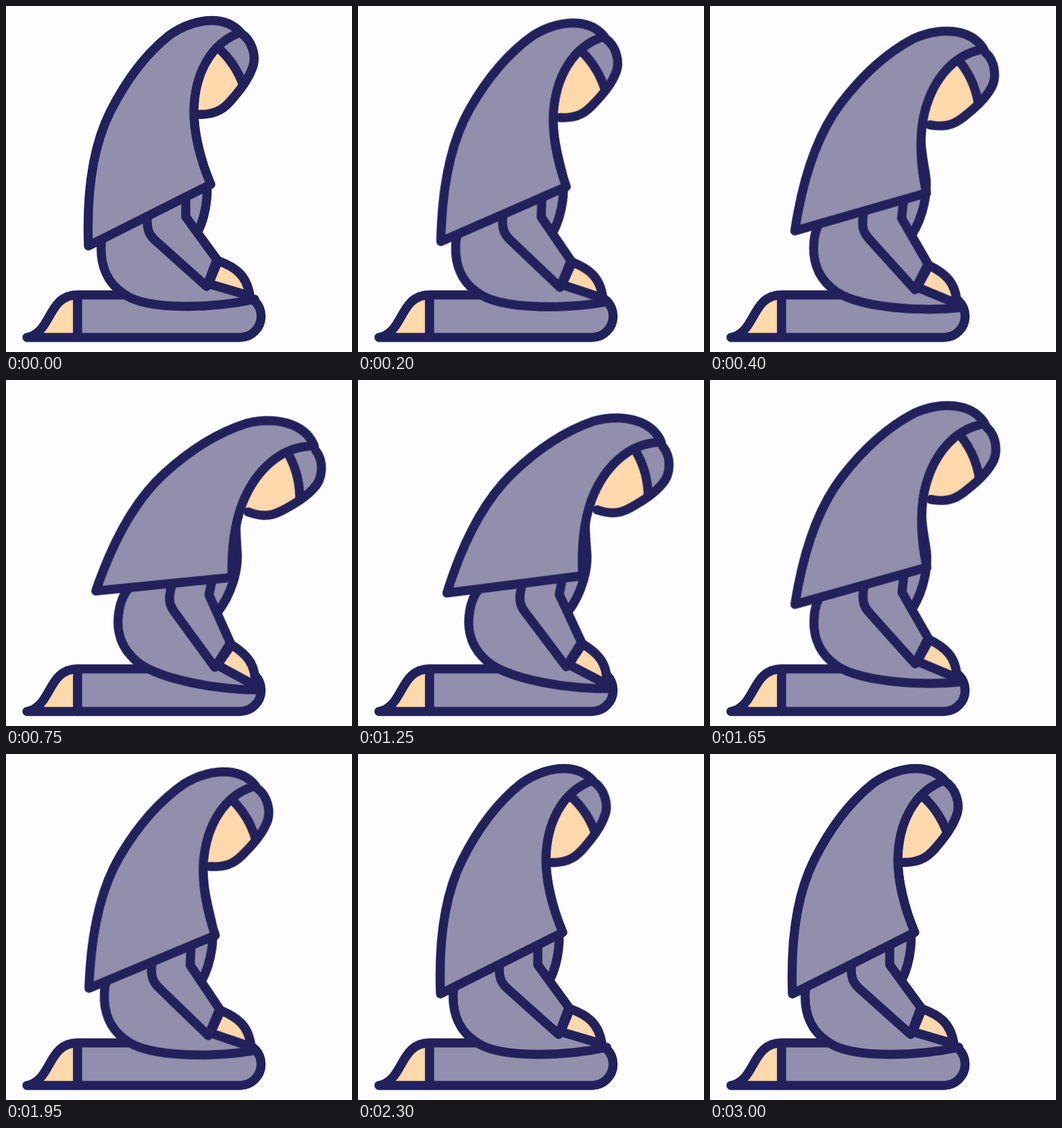
Recreate the animation shown at these times as an HTML page. Size 512x512 px, loop 3.05 s.

```html
<!DOCTYPE html>
<html lang="en">
<head>
<meta charset="utf-8">
<title>Kneeling figure</title>
<style>
  html, body { margin: 0; width: 100%; height: 100%; overflow: hidden; background: #fdfdff; }
  svg { display: block; width: 100%; height: 100%; }

  path { fill: none; }
  .line { stroke: #22215b; stroke-width: 13.4; stroke-linecap: round; stroke-linejoin: round; }
  .cloth { fill: #918fac; }
  .skin { fill: #ffd8ab; }

  /* Torso and hood lean together, each about its own pivot. */
  .torso, .hood { animation: lean 3050ms infinite; }
  .torso { --lean: 12.2deg; transform-origin: 255px 477px; }
  .hood { --lean: 21.2deg; transform-origin: 243px 363px; }
  .head { animation: nod 3050ms infinite; }

  @keyframes lean {
    0% { transform: rotate(0deg); animation-timing-function: cubic-bezier(.37, 0, .63, 1); }
    26.23%, 32.79% { transform: rotate(var(--lean)); animation-timing-function: cubic-bezier(.37, 0, .63, 1); }
    76.49%, 100% { transform: rotate(0deg); }
  }
  /* The head slips a little inside the hood. */
  @keyframes nod {
    0% { transform: translate(0, 0); animation-timing-function: ease-out; }
    23%, 41% { transform: translate(4.5px, 4.5px); animation-timing-function: ease-in; }
    76.49%, 100% { transform: translate(0, 0); }
  }
</style>
</head>
<body>
<svg viewBox="0 0 512 512">
  <g class="legs">
    <path class="line skin" d="M31 490.5C68 484 61 427.5 106 427.5V490.5Z"/>
    <path class="line cloth" d="M106 427.5H346A31.5 31.5 0 0 1 346 490.5H106Z"/>
  </g>

  <g class="torso">
    <path class="cloth" d="M160 310L141 352C139 385 151 410 173 425C192 440 230 444.5 268 444.5C310 444.5 340 440 368 434L284 334C298 305 301 268 294 243C288 222 280 195 278 165Z"/>
    <path class="line" d="M154 318Q142 333 141 352C139 385 151 410 173 425C192 440 230 444.5 268 444.5C310 444.5 340 440 368 434"/>
    <path class="line" d="M278 165C280 195 288 222 294 243C301 268 298 305 284 334"/>
    <path class="line skin" d="M314 377C338 386 356 397 361 429L300 411Z"/>
    <path class="line cloth" d="M209 300V318C209 333 213 340 222 348L297 415L312 375L266 312V276"/>
  </g>

  <g class="hood">
    <g class="head">
      <path class="skin" d="M314 62Q339 84 351 117L337 135C325 150 313 161 286 160.5L270 150Q276 90 314 62Z"/>
      <path class="cloth" d="M314 62Q339 84 351 117Q361 104 364 93C372 75 364 50 347 40L318 46Z"/>
      <path class="line" d="M314 62Q339 84 351 117"/>
      <path class="line" d="M347 40C364 50 372 75 364 93C359 107 349 121 337 135C325 150 313 161 286 160.5"/>
    </g>
    <path class="line cloth" d="M122 355L303 264C288 228 278 190 278 155C279 105 300 56 347 39C335 26 320 21.5 305 21.5C282 21.5 261 30 242 43C203 74 174 117 154 157C128 209 119 275 122 355Z"/>
  </g>
</svg>
</body>
</html>
```
